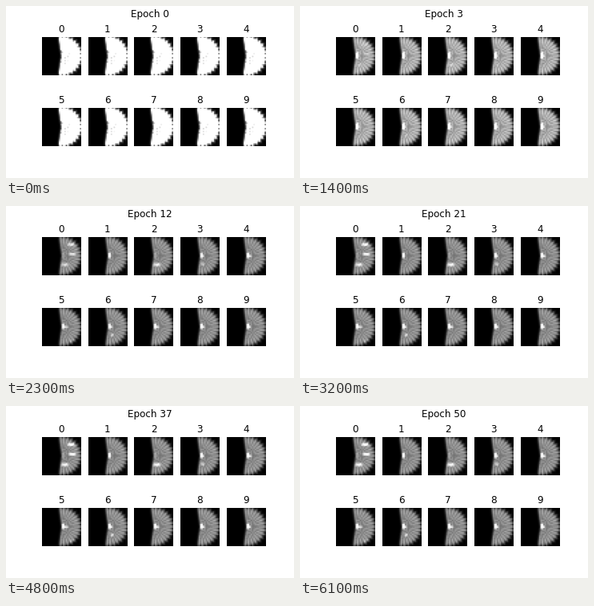
Animation, 360 px wide and 216 px high, one loop 7200 ms. Source, as a matplotlib script:

```python
import numpy as np
import matplotlib.pyplot as plt
from matplotlib.animation import FuncAnimation

STEP_MS = 100
FRAMES = 72
HOLD = 12           # frames spent on epoch 0
LAST_EPOCH = 50
N = 28              # samples per side of a picture
SIZE = 48           # side of a picture in stage pixels
HALF_ANGLE = np.radians(98)
BEAM = np.radians(11.75)

# Bright marks away from the centre of the fan
MARKS = {0: [(36, 10), (37, 22), (28, 35)], 2: [(28, 35)],
         3: [(27, 34)], 5: [(37, 42)], 6: [(29, 34)]}

rng = np.random.default_rng(4)
y, x = (np.mgrid[0:N, 0:N] + .5) * SIZE / N
dx, dy = x - SIZE / 2, y - SIZE / 2
radius = np.hypot(dx, dy)
angle = np.arctan2(dy, dx)
ripple = np.cos(2 * np.pi * angle / BEAM)


def sigmoid(v):
    return 1 / (1 + np.exp(-v))


def spot(cx, cy, w, h):
    return np.exp(-((x - cx) / w) ** 4 - ((y - cy) / h) ** 4)


def learned_detail(digit):
    """A core with an arm to the right, plus the digit's own marks."""
    marks = MARKS.get(digit, [])
    weak = digit in (0, 2)
    detail = (.2 if weak else .6) * spot(25.5, 23.5, 1.9, 3.4)
    if digit > 2:
        arm = rng.uniform(1, 3)
        detail += .4 * spot(26.5 + arm, 24.5, arm, 1.6)
    width, strength = (4.5, .5) if weak else (2.2, .3)
    return detail + sum(strength * spot(*m, width, 1.9) for m in marks)


inside = sigmoid((HALF_ANGLE - abs(angle)) * radius / .6)
inside *= sigmoid((23.2 + .9 * ripple - radius) / 1.1)
spokes = .64 + .09 * ripple * np.clip(radius / 9, 0, 1)
spokes *= .82 + .18 * np.clip(radius / 20, 0, 1)
fan = inside * (spokes + rng.normal(0, .02, (N, N)))
specks = (rng.random((N, N)) < .15) & (radius < 11)
flash = .7 * spot(25.7, 23.5, 2.1, 4)
details = [learned_detail(digit) for digit in range(10)]


def picture(digit, epoch):
    gain = .92 + 2.08 * np.exp(-epoch / 1.3)
    early = (1 - np.exp(-epoch / 1.6)) * np.exp(-max(epoch - 3, 0) / 3)
    pace = 4 + 2 * len(MARKS.get(digit, []))
    learned = 1 - np.exp(-max(epoch - 1, 0) / pace)
    image = gain * fan * (1 - .45 * specks * np.exp(-epoch / 1.5))
    image = image + inside * (early * flash + learned * details[digit])
    return np.clip(image, 0, 1)


plt.rcParams["font.family"] = "DejaVu Sans"
fig, axes = plt.subplots(2, 5, figsize=(5, 3), dpi=72)
fig.subplots_adjust(left=.125, right=.9, bottom=.125, top=.88,
                    wspace=.2, hspace=.2)
heading = fig.suptitle("Epoch 0", fontsize=12)
images = []
for digit, ax in enumerate(axes.flat):
    images.append(ax.imshow(picture(digit, 0), cmap="gray", vmin=0, vmax=1))
    ax.set_title(str(digit), fontsize=12)
    ax.axis("off")


def update(frame):
    epoch = min(max(frame - HOLD + 1, 0), LAST_EPOCH)
    heading.set_text(f"Epoch {epoch}")
    for digit, image in enumerate(images):
        image.set_data(picture(digit, epoch))
    return [heading, *images]


anim = FuncAnimation(fig, update, frames=FRAMES, interval=STEP_MS,
                     repeat=True, repeat_delay=0, blit=False)
plt.show()
```
